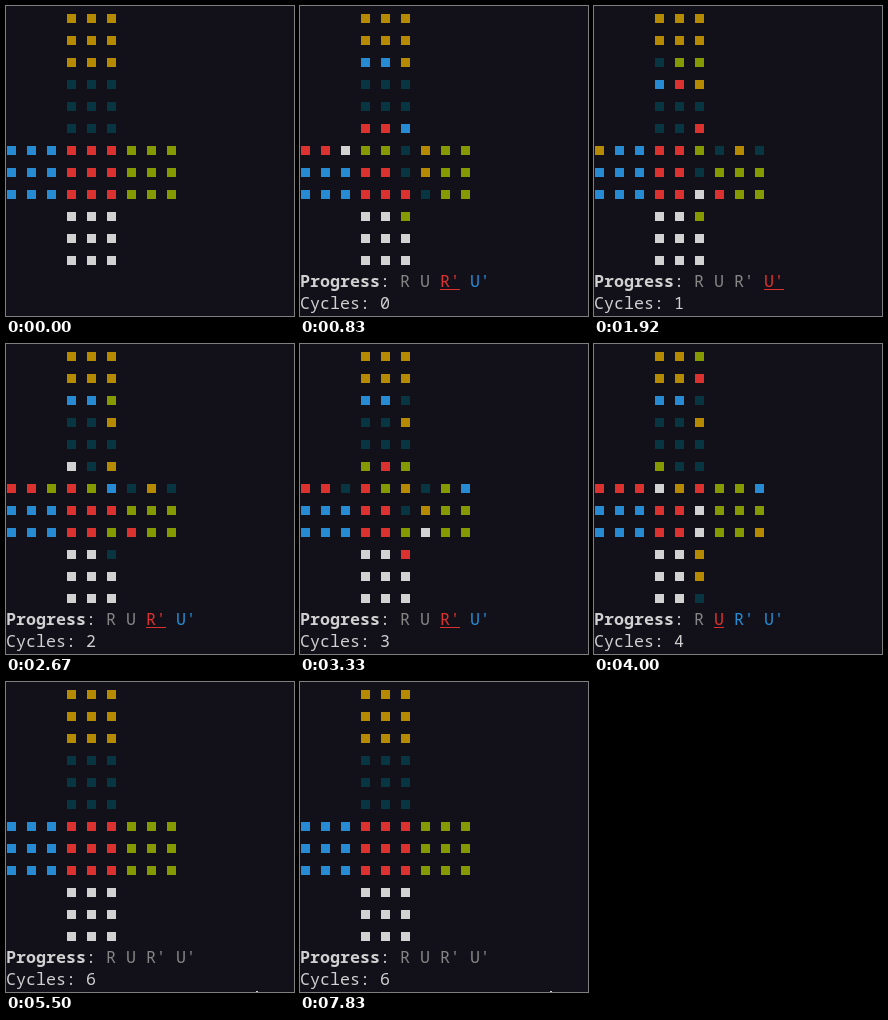
Write an HTML page with a canvas that moves like this. It is 288 by 310 pixels and loops after 8.41 s.

```html
<!DOCTYPE html>
<html lang="en">
<head>
<meta charset="utf-8">
<title>Cube cycles</title>
<style>
html, body { margin: 0; width: 100%; height: 100%; overflow: hidden; background: #12111a; }
canvas { display: block; }
</style>
</head>
<body>
<canvas id="stage" width="288" height="310"></canvas>
<script>
const ctx = document.getElementById('stage').getContext('2d');
const LOOP = 8410;
const FPS = 12;
const MOVES = ['R', 'U', "R'", "U'"];
const TOTAL = 24;
const BG = '#12111a', TEXT = '#d0d0d0', DONE = '#858585';
const COLORS = {
  Y: '#b58900', T: '#073642', B: '#268bd2',
  R: '#dc322f', G: '#859900', W: '#d2d2d2'
};
const FONT = '16.667px "Noto Sans Mono", "DejaVu Sans Mono", monospace';

// The net is a map from "row,col" to a colour letter.
const key = (r, c) => r + ',' + c;

function solved() {
  const net = {};
  const face = (r0, c0, color) => {
    for (let i = 0; i < 9; i++) net[key(r0 + Math.floor(i / 3), c0 + i % 3)] = color;
  };
  face(0, 3, 'Y');
  face(3, 3, 'T');
  face(6, 0, 'B');
  face(6, 3, 'R');
  face(6, 6, 'G');
  face(9, 3, 'W');
  return net;
}

const RINGS = {
  R: Array.from({ length: 12 }, (_, i) => key(i, 5)),
  U: Array.from({ length: 12 }, (_, i) => i < 9 ? key(6, i) : key(2, 14 - i))
};
const FACES = { R: [6, 6], U: [3, 3] };

function quarterTurn(net, side) {
  const next = { ...net };
  const ring = RINGS[side];
  ring.forEach((k, i) => { next[k] = net[ring[(i + 3) % 12]]; });
  const [r0, c0] = FACES[side];
  for (let r = 0; r < 3; r++)
    for (let c = 0; c < 3; c++)
      next[key(r0 + r, c0 + c)] = net[key(r0 + 2 - c, c0 + r)];
  return next;
}

function apply(net, move) {
  const turns = move.length > 1 ? 3 : 1;
  for (let i = 0; i < turns; i++) net = quarterTurn(net, move[0]);
  return net;
}

const states = [solved()];
for (let i = 0; i < TOTAL; i++) states.push(apply(states[i], MOVES[i % 4]));

function drawNet(net) {
  for (const k in net) {
    const [r, c] = k.split(',').map(Number);
    ctx.fillStyle = COLORS[net[k]];
    ctx.fillRect(1 + 20 * c, 8 + 22 * r, 9, 9);
  }
}

function write(text, col, y, color, weight = '') {
  ctx.font = weight + ' ' + FONT;
  ctx.fillStyle = color;
  ctx.fillText(text, col * 10, y);
}

function drawStatus(step) {
  const finished = step > TOTAL;
  const current = finished ? 4 : (step - 1) % 4;
  write('Progress', 0, 281, TEXT, 'bold');
  write(':', 8, 281, TEXT);
  let col = 10;
  MOVES.forEach((move, i) => {
    const color = i < current ? DONE : i === current ? COLORS.R : COLORS.B;
    write(move, col, 281, color);
    if (i === current) ctx.fillRect(col * 10, 283, move.length * 10, 1);
    col += move.length + 1;
  });
  write('Cycles: ' + Math.floor((step - 1) / 4), 0, 303, TEXT);
}

function cursorOn(t) {
  return t >= 5420 && !(t >= 6000 && t < 6580) && !(t >= 7250 && t < 7830);
}

function draw(t) {
  const tick = Math.floor((t + 5) * FPS / 1000);
  const step = Math.max(0, Math.min(TOTAL + 1, Math.floor(tick / 2.5) - 1));
  ctx.fillStyle = BG;
  ctx.fillRect(0, 0, 288, 310);
  drawNet(states[Math.min(step, TOTAL)]);
  if (step > 0) drawStatus(step);
  if (cursorOn(t)) {
    ctx.fillStyle = TEXT;
    ctx.fillRect(250, 309, 2, 1);
  }
}

const start = performance.now();
function tickFrame() {
  draw((performance.now() - start) % LOOP);
  requestAnimationFrame(tickFrame);
}
tickFrame();
</script>
</body>
</html>
```
